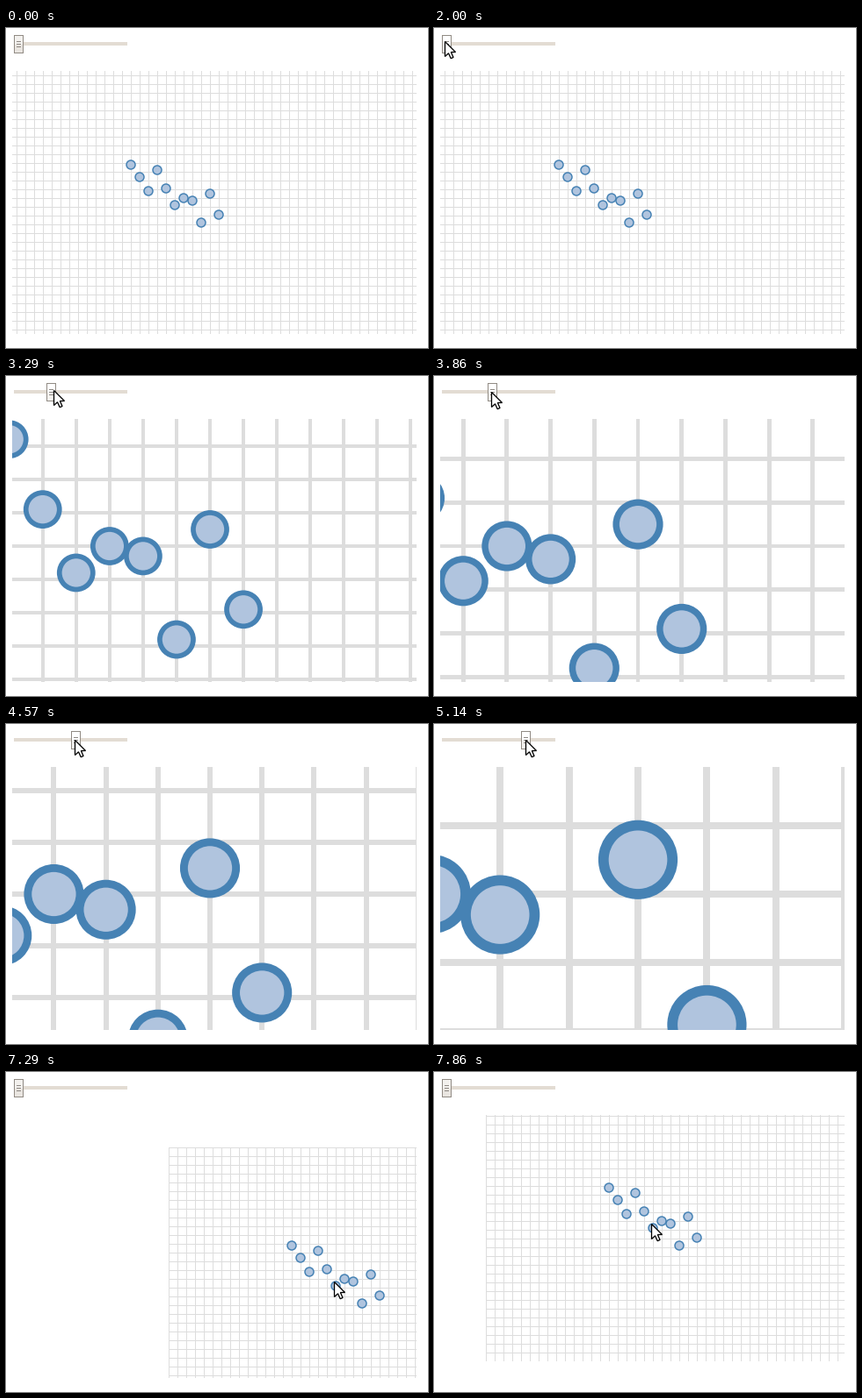
Animation, 480 px wide and 365 px high, one loop 8 s. Source, as a matplotlib script:

```python
import numpy as np
import matplotlib.pyplot as plt
from matplotlib.animation import FuncAnimation
from matplotlib.collections import PolyCollection
from matplotlib.patches import Circle, Polygon, Rectangle

W, H, DPI = 480, 365, 80
PX = 72 / DPI                     # one pixel in points
LOOP, INTERVAL = 8000, 50
STEP = LOOP / 56                  # the picture moves in steps of 1/7 s

CENTER = np.array([232, 194])     # fixed point of the zoom
GRAB = np.array([190, 197])       # where the cursor takes hold of the plot
DRAG_START = 47
POINTS = np.column_stack([np.arange(-90, 11, 10),
                          [-38, -24, -8, -32, -11, 8, 0, 3, 28, -5, 19]])
ARROW = np.array([(0, 0), (0, 17), (4, 13.3), (6.7, 19.2), (9.5, 18),
                  (6.9, 12), (12, 12)])

# Step, zoom, cursor x, cursor y; eased in between
POSES = np.array([(2, 1, 11, 5), (3, 1, 12, 15), (14, 1, 12, 15),
                  (17, 1, 15, 15), (24, 3.97, 56, 16), (25, 3.97, 56, 16),
                  (27, 4.97, 65, 18), (29, 4.97, 65, 18), (37, 7.97, 106, 18),
                  (44, 1, 14, 18), (47, 1, 190, 197), (51, 1, 373, 239),
                  (55, 1, 247, 173)])


def pose(k):
    j = np.clip(np.searchsorted(POSES[:, 0], k), 1, len(POSES) - 1)
    a, b = POSES[j - 1], POSES[j]
    u = np.clip((k - a[0]) / (b[0] - a[0]), 0, 1)
    _, zoom, x, y = a + (b - a) * u * u * (3 - 2 * u)
    return zoom, np.round([x, y])


def bar(x0, y0, x1, y1):
    return [(x0, y0), (x1, y0), (x1, y1), (x0, y1)]


def box(x, y, w, h, color, z=3):
    return ax.add_patch(Rectangle((x, y), w, h, fc=color, lw=0, zorder=z))


fig = plt.figure(figsize=(W / DPI, H / DPI), dpi=DPI, facecolor="white")
ax = fig.add_axes([0, 0, 1, 1])
ax.set(xlim=(0, W), ylim=(H, 0))
ax.axis("off")
view = Rectangle((7, 49), 460, 300, transform=ax.transData)

BARS = np.array([bar(-230, y - 0.5, 240, y + 0.5) for y in range(-150, 151, 10)]
                + [bar(x - 0.5, -150, x + 0.5, 160) for x in range(-230, 231, 10)])
grid = PolyCollection(BARS, facecolors="#dddddd", linewidths=0,
                      antialiaseds=False)
ax.add_collection(grid, autolim=False)
grid.set_clip_path(view)

dots = []
for _ in POINTS:
    dot = ax.add_patch(Circle((0, 0), 5, fc="lightsteelblue", ec="steelblue",
                              zorder=2))
    dot.set_clip_path(view)
    dots.append(dot)

box(9, 16, 129, 4, "#e3dcd3")
# Handle parts with their offset from the handle's left edge
upper = box(10, 9, 9, 10, "white", 4)
lower = box(10, 19, 9, 9, "white", 4)
handle = [(box(9, 8, 11, 21, "#918b84", 3.5), 0), (upper, 1), (lower, 1)]
handle += [(box(12, y, 5, 1, "#8d8883", 4.5), 3) for y in (15, 18, 21)]

cursor = ax.add_patch(Polygon(ARROW, closed=True, fc="white", ec="black",
                              lw=1.3 * PX, joinstyle="miter", zorder=6,
                              snap=False))


def draw(i):
    k = int((i * INTERVAL + 45) / STEP)
    zoom, tip = pose(k)
    origin = CENTER + (tip - GRAB if k >= DRAG_START else 0)

    # Grid edges sit on whole pixels
    grid.set_verts(np.floor(BARS * zoom + origin + 0.5))
    for dot, p in zip(dots, POINTS):
        dot.center = tuple(p * zoom + origin)
        dot.set_radius(5 * zoom)
        dot.set_linewidth(1.5 * zoom * PX)

    left = 9 + round(13.2 * (zoom - 1))
    for part, dx in handle:
        part.set_x(left + dx)
    hover = 3 <= k <= 44
    upper.set_facecolor("white" if hover else "#f3f1ee")
    lower.set_facecolor("#f4f2ef" if hover else "#e9e5e0")

    cursor.set_xy(ARROW + tip + 0.5)
    cursor.set_visible(k >= 2)
    return [grid, *dots, *(part for part, _ in handle), cursor]


anim = FuncAnimation(fig, draw, frames=LOOP // INTERVAL, interval=INTERVAL,
                     repeat=True, repeat_delay=0)
plt.show()
```
